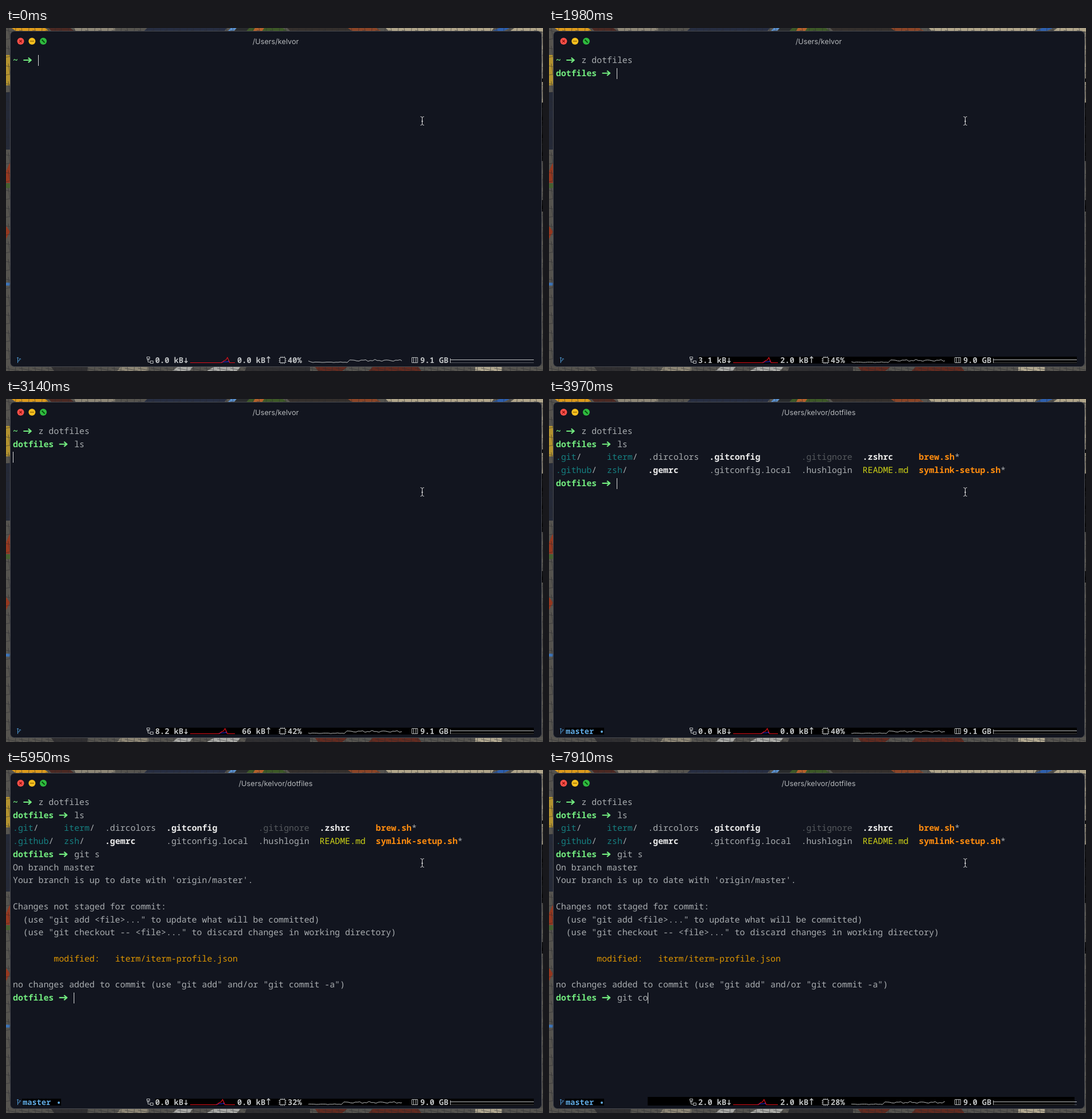
Recreate the animation shown at these times as an HTML page. Size 936 by 598 pixels, loop 8 s.

```html
<!DOCTYPE html>
<html lang="en">
<head>
<meta charset="utf-8">
<title>Terminal</title>
<style>
html, body { margin: 0; width: 100%; height: 100%; overflow: hidden; background: #12151f; }
svg { display: block; width: 936px; height: 598px; }
text { white-space: pre; text-rendering: geometricPrecision; }
.term text { font: 14.85px "Noto Sans Mono", monospace; fill: #a9adb0; }
.term .ok, .term .b, .term .exe { font-weight: 700; }
.term .ok { fill: #72ea7f; }
.term .mod { fill: #dc9500; }
.b { fill: #ebebeb; }
.exe { fill: #ff8c0e; }
.dir { fill: #167f80; }
.dim { fill: #55595d; }
.doc { fill: #cbd017; }
.ghost { fill: #6c7074; }
.bar text { font: 700 13.67px "Noto Sans Mono", monospace; fill: #bfc2c4; }
.bar .branch { fill: #62ace6; }
.line { fill: none; stroke: #b9bcbe; }
#title { font: 12.7px Inter, sans-serif; fill: #b4b7ba; text-anchor: middle; }
</style>
</head>
<body>
<svg viewBox="0 0 936 598">
  <defs>
    <pattern id="hatch" width="23" height="31" patternUnits="userSpaceOnUse">
      <path d="M0 4L23 9M0 20L23 15M4 0L9 31M17 0L14 31" stroke="#25262b" stroke-width=".8" opacity=".65"/>
    </pattern>
    <clipPath id="netClip"><rect x="321" y="572" width="78" height="14"/></clipPath>
    <clipPath id="cpuClip"><rect x="527" y="572" width="163" height="14"/></clipPath>
  </defs>

  <!-- wallpaper edges -->
  <g id="wall">
    <rect width="936" height="598" fill="#56544f"/>
    <path fill="#dc9a1c" d="M10 0H68L76 6H18z"/>
    <path fill="#4c2923" d="M74 0H112L120 6H80z"/>
    <path fill="#8d8676" d="M118 0H190V6H122z"/>
    <path fill="#272e42" d="M246 0H385L380 6H240z"/>
    <path fill="#5a91d0" d="M392 0H402L396 6H386z"/>
    <path fill="#292b2d" d="M402 0H424V6H398z"/>
    <path fill="#3d5927" d="M424 0H482L492 6H418z"/>
    <path fill="#b4602b" d="M434 0H450L446 6H430z"/>
    <path fill="#35302d" d="M490 0H610V6H496z"/>
    <path fill="#8c4527" d="M596 0H645L655 6H604z"/>
    <path fill="#b0a58a" d="M662 0H850L846 6H668zM886 0H936V6H878z"/>
    <path fill="#2d5fae" d="M860 0H878L866 6H846z"/>
    <path fill="#b3922f" d="M0 47H8V100H0z"/>
    <path fill="#252a38" d="M0 112H8V212H0z"/>
    <path fill="#96381f" d="M0 250L7 234V270H0zM0 345L7 355L0 368z"/>
    <path fill="#455f2f" d="M0 271H8V279H0z"/>
    <path fill="#3d74b8" d="M0 444H8V449H0z"/>
    <path fill="#8d8675" d="M200 590H248V598H194z"/>
    <path fill="#b0a78f" d="M818 590H864V598H818z"/>
    <path fill="#a9a9a5" d="M300 590H326L320 598H290zM364 590H410L402 598H350z"/>
    <path fill="#302f31" d="M78 590H142V598H84zM420 590H530V598H416z"/>
    <path fill="#632b20" d="M538 590H596L586 598H544zM640 590H718L724 598H632z"/>
    <path fill="#8b8473" d="M934 6H936V232H934z"/>
    <path fill="#050506" d="M934 88H936V94H934zM934 130H936V232H934zM934 300H936V320H934z"/>
    <rect width="936" height="598" fill="url(#hatch)"/>
  </g>

  <!-- window -->
  <rect x="7.5" y="5.5" width="926" height="585" rx="7" fill="#12151f" stroke="#484a50"/>
  <circle cx="25.5" cy="23" r="6" fill="#fc4f48"/>
  <circle cx="45.3" cy="23" r="6" fill="#f5bf1f"/>
  <circle cx="65" cy="23" r="6" fill="#2fbb3f"/>
  <g fill="none" stroke-width="1.2">
    <path d="M23.3 20.8l4.4 4.4m0-4.4l-4.4 4.4" stroke="#7b0c08"/>
    <path d="M41.8 23h7" stroke="#855a00"/>
    <path d="M62.5 20.5l5 5" stroke="#06500d" stroke-width="2"/>
  </g>
  <text id="title" x="470" y="28"></text>

  <g class="term" id="term"></g>
  <rect id="caret" width="1" height="19" fill="#d8d9da"/>

  <!-- status bar -->
  <g class="bar">
    <rect id="strip" y="573" height="12" fill="#000"/>
    <g id="branch">
      <rect x="28" y="573" width="68" height="12" fill="#000"/>
      <text class="branch" x="29" y="584">master</text>
      <circle cx="92" cy="580" r="2" fill="#62ace6"/>
    </g>
    <path d="M20.5 574v10M20.5 581q4-.5 4-4.5M19 575.5l1.5-1.5 1.5 1.5M23 577.5l1.5-1.5 1.5 1.5" fill="none" stroke="#4f9bd5"/>
    <g class="line">
      <path d="M245.5 573.5h5v3h-5zM245.5 578.5h5M247.5 576.5v6h4M251.5 580.5h5v4h-5z"/>
      <path d="M477.5 574.5h9v9h-9zM479.5 572.5v2m3-2v2m3-2v2m-6 9v2m3-2v2m3-2v2M475.5 576.5h2m-2 3h2m-2 3h2m9-6h2m-2 3h2m-2 3h2"/>
      <path d="M707.5 574.5h10v9h-10zM710.5 574.5v9m4-9v9"/>
      <path d="M313.8 575v8.5m-2.6-2.8l2.6 2.8l2.6-2.8M457.5 584v-11m-2.8 3l2.8-3l2.8 3" stroke-width="1.5"/>
      <path d="M774.5 576v8M775 578.5H920"/>
      <path d="M775 583.5H920" opacity=".4"/>
    </g>
    <text id="down" x="260" y="584"></text>
    <text id="up" x="403" y="584"></text>
    <text id="cpu" x="491" y="584"></text>
    <text id="mem" x="722" y="584"></text>
    <g clip-path="url(#netClip)" fill="none">
      <g id="net">
        <path d="M375 583L380 582H386L388 580V583" stroke="#2430e8"/>
        <path d="M300 583.5H376L380 580L383 579L386 574.5L388 579L390 583.5H440" stroke="#e0101a" stroke-width="1.2"/>
      </g>
    </g>
    <g clip-path="url(#cpuClip)"><path id="load" class="line"/></g>
  </g>

  <path d="M722.5 154.5q2.5 0 3 2q.5-2 3-2M725.5 156v12M722.5 169.5q2.5 0 3-2q.5 2 3 2M724 162.5h3" fill="none" stroke="#e6e6e6"/>
</svg>

<script>
const LOOP = 8000, LEFT = 12, COL = 8.91, ROW = 22.73;
const NS = 'http://www.w3.org/2000/svg';
const $ = id => document.getElementById(id);
const colX = col => LEFT + col * COL;

function add(parent, tag, attrs, text = '') {
  const el = document.createElementNS(NS, tag);
  for (const key in attrs) el.setAttribute(key, attrs[key]);
  el.textContent = text;
  return parent.appendChild(el);
}

const write = (parent, row, col, text, cls = '') =>
  add(parent, 'text', { x: colX(col), y: 61 + row * ROW, class: cls }, text);

const timed = [];
function group(from) {
  const el = add($('term'), 'g', {});
  timed.push([el, from]);
  return el;
}

// Each step: [time, typed, suggestion]
function prompt(row, from, dir, steps) {
  const g = group(from), col = dir.length + 4;
  write(g, row, 0, dir, 'ok');
  const x = colX(dir.length + 1), y = 56 + row * ROW;
  add(g, 'path', {
    d: `M${x + .5} ${y}h13.5m-5-4.2l5 4.2l-5 4.2`,
    fill: 'none', stroke: '#72ea7f', 'stroke-width': 2.2, 'stroke-linejoin': 'round'
  });
  const line = write(g, row, col, '');
  const typed = add(line, 'tspan', {}), ghost = add(line, 'tspan', { class: 'ghost' });
  return { row, from, col, typed, ghost, steps: [[from, '', ''], ...steps] };
}

const rest = 'commit -m "update zshrc"';
const prompts = [
  prompt(0, 0, '~', [
    [350, 'z', ' dotfiles'], [470, 'z ', 'dotfiles'],
    [730, 'z d', 'otfiles'], [1090, 'z dotfiles', '']
  ]),
  prompt(1, 1440, 'dotfiles', [[2160, 'l', 's'], [2520, 'ls', '']]),
  prompt(4, 3160, 'dotfiles', [
    [4060, 'g', 'it ' + rest], [4150, 'gi', 't ' + rest], [4240, 'git', ' ' + rest],
    [4320, 'git ', rest], [4500, 'git s', '']
  ]),
  prompt(15, 5150, 'dotfiles', [
    [6850, 'g', ''], [6940, 'gi', ''], [7030, 'git', ''], [7110, 'git ', ''],
    [7370, 'git co', ''], [7460, 'git com', ''], [7910, 'git co', '']
  ])
];
// After Enter the caret waits at the start of the next row.
const waits = [[1350, 1440, 1], [3060, 3160, 2], [5060, 5150, 5]];

const listing = group(3160);
const file = (row, col, name, cls, mark = '') => {
  const el = write(listing, row, col, '');
  add(el, 'tspan', { class: cls }, name);
  add(el, 'tspan', {}, mark);
};
file(2, 0, '.git', 'dir', '/');
file(2, 10, 'iterm', 'dir', '/');
file(2, 18, '.dircolors', '');
file(2, 30, '.gitconfig', 'b');
file(2, 48, '.gitignore', 'dim');
file(2, 60, '.zshrc', 'b');
file(2, 71, 'brew.sh', 'exe', '*');
file(3, 0, '.github', 'dir', '/');
file(3, 10, 'zsh', 'dir', '/');
file(3, 18, '.gemrc', 'b');
file(3, 30, '.gitconfig.local', '');
file(3, 48, '.hushlogin', '');
file(3, 60, 'README.md', 'doc');
file(3, 71, 'symlink-setup.sh', 'exe', '*');

const report = group(5150);
[
  'On branch master',
  "Your branch is up to date with 'origin/master'.",
  '',
  'Changes not staged for commit:',
  '  (use "git add <file>..." to update what will be committed)',
  '  (use "git checkout -- <file>..." to discard changes in working directory)',
  '',
  '        modified:   iterm/iterm-profile.json',
  '',
  'no changes added to commit (use "git add" and/or "git commit -a")'
].forEach((text, i) => {
  const indent = text.search(/\S|$/);
  write(report, 5 + i, indent, text.trim(), i === 7 ? 'mod' : '');
});

// [time, download, upload, cpu %, memory]
const stats = [
  [0, '0.0', '0.0', 40, '9.1'], [1000, '1.0', '1.0', 51, '9.1'],
  [1980, '3.1', '2.0', 45, '9.0'], [2960, '8.2', ' 66', 42, '9.1'],
  [3970, '0.0', '0.0', 40, '9.1'], [4950, '1.0', '2.0', 31, '9.0'],
  [5950, '0.0', '0.0', 32, '9.0'], [6940, '1.0', '1.0', 30, '9.0'],
  [7910, '2.0', '2.0', 28, '9.0']
];

let load = 'M527 580.5L531 582';
for (let x = 535; x < 715; x += 4) {
  const wave = Math.sin(x * .31) + Math.sin(x * .73) * .8;
  const y = x < 599 ? 582.7 + wave * .3 : 579.6 + wave;
  load += `L${x} ${y.toFixed(1)}`;
}
$('load').setAttribute('d', load);

const latest = (list, t) => list.filter(item => item[0] <= t).pop();
const toggle = (el, on) => { el.style.display = on ? '' : 'none'; };
const shift = (id, dx) => $(id).setAttribute('transform', `translate(${dx} 0)`);

function setCaret(row, col) {
  $('caret').setAttribute('x', Math.floor(colX(col)));
  $('caret').setAttribute('y', Math.round(47 + row * ROW));
}

function render(t) {
  for (const [el, from] of timed) toggle(el, t >= from);
  for (const p of prompts) {
    if (t < p.from) continue;
    const [, typed, ghost] = latest(p.steps, t);
    p.typed.textContent = typed;
    p.ghost.textContent = ghost;
    setCaret(p.row, p.col + typed.length);
  }
  const wait = waits.find(([from, to]) => t >= from && t < to);
  if (wait) setCaret(wait[2], 0);

  $('title').textContent = '/Users/kelvor' + (t >= 3160 ? '/dotfiles' : '');
  toggle($('branch'), t >= 3250);

  const stat = latest(stats, t), tick = stats.indexOf(stat);
  $('down').textContent = stat[1] + ' kB';
  $('up').textContent = stat[2] + ' kB';
  $('cpu').textContent = stat[3] + '%';
  $('mem').textContent = stat[4] + ' GB';
  shift('net', -1.4 * tick);
  shift('load', -1.7 * tick);

  const wide = t >= 7910, strip = $('strip');
  toggle(strip, t >= 1000);
  strip.setAttribute('x', wide ? 172 : 260);
  strip.setAttribute('width', wide ? 744 : 660);
  strip.setAttribute('y', wide ? 570 : 573);
  strip.setAttribute('height', wide ? 15 : 12);
}

const start = performance.now();
function frame() {
  render((performance.now() - start) % LOOP);
  requestAnimationFrame(frame);
}
frame();
</script>
</body>
</html>
```
